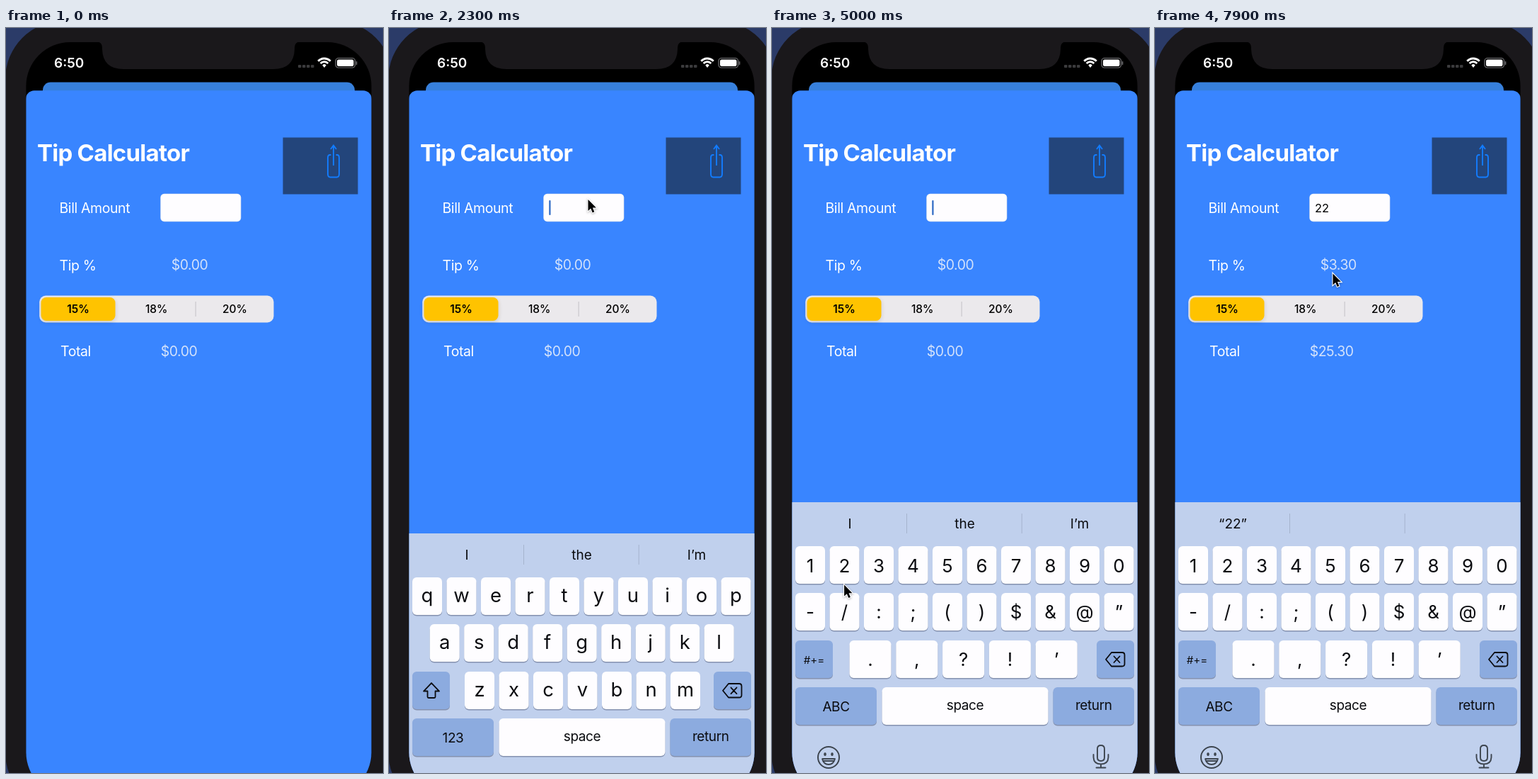
An HTML page with a canvas for the animation above (8000 ms loop, 533x1051 px).

```html
<!DOCTYPE html>
<html lang="en">
<head>
<meta charset="utf-8">
<title>Tip Calculator</title>
<style>
html, body { margin: 0; width: 100%; height: 100%; overflow: hidden; background: #1a181b; }
canvas { display: block; width: 533px; height: 1051px; }
</style>
</head>
<body>
<canvas id="stage"></canvas>
<script>
const LOOP = 8000;
const FIRST_DIGIT = 5640, SECOND_DIGIT = 6100;
const KEYBOARD_START = 2120, NUMBERS_AT = 3550, CARET_AT = 2000;
const KEY_PITCH = 48.5, ROWS = [731, 797, 864, 930];
const INK = '#0b0c10';

const canvas = document.getElementById('stage');
const ctx = canvas.getContext('2d');
const ratio = window.devicePixelRatio || 1;
canvas.width = 533 * ratio;
canvas.height = 1051 * ratio;

function box(x, y, w, h, radius, fill) {
  ctx.beginPath();
  ctx.roundRect(x, y, w, h, radius);
  ctx.fillStyle = fill;
  ctx.fill();
}

function text(str, x, y, size, { weight = 400, color = INK, align = 'left', spacing = 0 } = {}) {
  ctx.font = `${weight} ${size}px Inter, sans-serif`;
  ctx.letterSpacing = spacing + 'px';
  ctx.textAlign = align;
  ctx.fillStyle = color;
  ctx.fillText(str, x, y);
}

function stroke(path, color, width) {
  ctx.strokeStyle = color;
  ctx.lineWidth = width;
  ctx.stroke(new Path2D(path));
}

// Pointer stops: time, x, y
const stops = [
  [1000, 440, 300], [1700, 281.5, 242], [2350, 281.5, 242], [2800, 162.5, 784],
  [3300, 83.5, 947], [4400, 83.5, 947], [5200, 105.5, 756], [6500, 105.5, 756],
  [7300, 251.5, 346.5], [8000, 251.5, 346.5]
];

function pointerAt(t) {
  const next = stops.findIndex(stop => stop[0] > t);
  if (next < 1) return null;
  const [t0, x0, y0] = stops[next - 1], [t1, x1, y1] = stops[next];
  const p = (t - t0) / (t1 - t0), eased = p * p * (3 - 2 * p);
  return [x0 + (x1 - x0) * eased, y0 + (y1 - y0) * eased];
}

function drawPointer([x, y]) {
  ctx.save();
  ctx.translate(x, y);
  const arrow = new Path2D('M0 0V16L3.7 12.6L6.2 18.4L8.8 17.3L6.4 11.6H11.4Z');
  ctx.shadowColor = 'rgba(0,0,0,.3)';
  ctx.shadowBlur = 3 * ratio;
  ctx.shadowOffsetY = ratio;
  ctx.lineWidth = 2.2;
  ctx.strokeStyle = '#fff';
  ctx.stroke(arrow);
  ctx.shadowColor = 'transparent';
  ctx.fillStyle = '#000';
  ctx.fill(arrow);
  ctx.restore();
}

function drawStatusBar() {
  ctx.fillStyle = '#1a181b';
  ctx.fill(new Path2D('M128 19Q136 20 136 28V30Q137 58 166 58H378Q407 58 408 30V28Q408 20 416 19Z'));
  text('6:50', 68, 56, 19, { weight: 600, color: '#fff' });
  for (let i = 0; i < 4; i++) box(413 + i * 6, 52, 4.5, 4, 1, '#3b3b3d');

  ctx.strokeStyle = '#fff';
  ctx.lineWidth = 2.8;
  for (const r of [12, 7.3]) {
    ctx.beginPath();
    ctx.arc(450, 55, r, -Math.PI * .76, -Math.PI * .24);
    ctx.stroke();
  }
  ctx.beginPath();
  ctx.moveTo(450, 56);
  ctx.arc(450, 55, 3.7, -Math.PI * .76, -Math.PI * .24);
  ctx.fillStyle = '#fff';
  ctx.fill();

  ctx.beginPath();
  ctx.roundRect(466, 42.5, 27.5, 13.5, 4);
  ctx.strokeStyle = '#77777a';
  ctx.lineWidth = 1.2;
  ctx.stroke();
  box(468, 44.5, 23.5, 9.5, 2.3, '#fff');
  box(494.8, 47, 1.5, 5, 1, '#77777a');
}

function drawForm(t) {
  const bill = t < FIRST_DIGIT ? '' : t < SECOND_DIGIT ? '2' : '22';
  const money = value => '$' + value.toFixed(2);
  const label = { color: '#fff', spacing: -.4 };
  const amount = { color: '#d3e2fb', spacing: -.5 };

  text('Tip Calculator', 44, 188, 33, { weight: 700, color: '#fff', spacing: -.75 });
  text('Bill Amount', 75.5, 261, 19.5, label);
  text('Tip %', 75.5, 341.5, 19.5, label);
  text('Total', 77, 463, 19.5, label);
  text(money(bill * .15), 233.7, 340.5, 19.5, amount);
  text(money(bill * 1.15), 218.7, 463, 19.5, amount);

  box(391.5, 154.5, 106, 80, 0, '#23457b');
  stroke('M459.5 179H458Q455 179 455 183V206Q455 210.5 458.5 210.5H467.5Q471 210.5 471 206V183Q471 179 468 179H466.5M463 194V165.5M459 171L463 165.5L467 171', '#127cff', 1.9);

  box(218.3, 233.7, 114, 39.5, 5.5, '#d9dfec');
  box(218.9, 234.3, 112.8, 38.3, 5, '#fefdff');
  text(bill, 226, 260, 16.5, { color: '#000' });
  const caretReset = t >= SECOND_DIGIT ? SECOND_DIGIT : t >= FIRST_DIGIT ? FIRST_DIGIT : CARET_AT;
  if (t >= CARET_AT && (t - caretReset) % 1000 < 600) {
    box(226.3 + bill.length * 9.5, 243, 2.2, 21, 1, '#2c69c4');
  }

  box(47.2, 377.5, 331.3, 38, 9, '#ebe9ec');
  ctx.save();
  ctx.shadowColor = 'rgba(0,0,0,.14)';
  ctx.shadowBlur = 6 * ratio;
  ctx.shadowOffsetY = 2 * ratio;
  box(49.5, 380, 105, 33, 7.5, '#ffc300');
  ctx.restore();
  box(267.5, 386, 1.2, 21, 0, '#c9c8cc');
  ['15%', '18%', '20%'].forEach((rate, i) =>
    text(rate, 102 + i * 110.7, 402, 15.5, { weight: i ? 500 : 600, color: '#000', align: 'center' }));
}

function key(x, y, w, label, size, baseline, fill = '#fefdff') {
  box(x, y + 1.5, w, 53, 6, '#8592af');
  box(x, y, w, 53, 6, fill);
  text(label, x + w / 2, y + baseline, size, { align: 'center', spacing: size === 19 ? -.4 : 0 });
}

function keyRow(labels, x, y, size, baseline, pitch = KEY_PITCH, width = 42) {
  [...labels].forEach((c, i) => key(x + i * pitch, y, width, c, size, baseline));
}

function drawSuggestions(t) {
  const word = (str, x) => text(str, x, 706, 19, { align: 'center' });
  box(190, 685, 1, 28, 0, '#a5b3cd');
  box(352.7, 685, 1, 28, 0, '#a5b3cd');
  if (t < FIRST_DIGIT) {
    ['I', 'the', 'I’m'].forEach((str, i) => word(str, 110 + i * 162.5));
  } else if (t < FIRST_DIGIT + 140) {
    text('“2', 99, 706, 19);
    text('”', 118, 706, 19, { color: 'rgba(11,12,16,.12)' });
    box(259.5, 696, 1, 11, 0, '#aebdd8');
    box(423.5, 696, 1, 11, 0, '#aebdd8');
  } else {
    word(t < SECOND_DIGIT ? '“2”' : '“22”', 110);
  }
}

function drawKeyboard(t) {
  if (t < KEYBOARD_START) return;
  const numeric = t >= NUMBERS_AT, action = '#8cabdf';
  const k = (t - KEYBOARD_START) * .0205;
  ctx.save();
  ctx.translate(0, 382 * (1 + k) * Math.exp(-k));
  box(28, 669, 489, 420, 0, '#c0d0ed');
  drawSuggestions(t);

  const [top, middle, lower, bottom] = ROWS;
  if (numeric) {
    keyRow('1234567890', 33, top, 26, 37);
    keyRow('-/:;()$&@”', 33, middle, 26, 35.5);
    keyRow('.,?!’', 109.5, lower, 26, 35.5, 65.8, 59);
  } else {
    keyRow('qwertyuiop', 33, top, 27.5, 34.5);
    keyRow('asdfghjkl', 57.7, middle, 27.5, 34.5);
    keyRow('zxcvbnm', 107, lower, 27.5, 34.5);
  }

  key(33, lower, 53, numeric ? '#+=' : '', 15, 32.5, action);
  key(459, lower, 53, '', 19, 33, action);
  key(33, bottom, 115, numeric ? 'ABC' : '123', 19, 33.5, action);
  key(155.5, bottom, 235, 'space', 19, 32);
  key(397.5, bottom, 114.5, 'return', 19, 32, action);

  ctx.lineJoin = ctx.lineCap = 'round';
  if (!numeric) stroke('M60 880L49 891.5H54.5V899.5Q54.5 901 56 901H64Q65.5 901 65.5 899.5V891.5H71Z', INK, 1.8);
  stroke('M480 881H495Q498.5 881 498.5 884.5V897Q498.5 900.5 495 900.5H480L472 890.7ZM483.5 886.5L491.5 895M491.5 886.5L483.5 895', INK, 1.8);

  const icon = '#3d454f';
  ctx.beginPath();
  ctx.arc(80, 1029, 15, 0, Math.PI * 2);
  ctx.strokeStyle = icon;
  ctx.lineWidth = 2;
  ctx.stroke();
  for (const x of [75, 85]) {
    ctx.beginPath();
    ctx.ellipse(x, 1024.5, 1.8, 2.6, 0, 0, Math.PI * 2);
    ctx.fillStyle = icon;
    ctx.fill();
  }
  stroke('M71 1031H89Q87 1039 80 1039Q73 1039 71 1031ZM72.5 1034H87.5', icon, 1.8);
  stroke('M460 1017Q460 1012 465 1012Q470 1012 470 1017V1029Q470 1034 465 1034Q460 1034 460 1029ZM454.5 1025V1029Q455 1038.5 465 1038.5Q475 1038.5 475.5 1029V1025M465 1038.5V1043.5M458.5 1043.5H471.5', icon, 1.9);
  ctx.restore();
}

function draw(t) {
  ctx.setTransform(ratio, 0, 0, ratio, 0, 0);
  ctx.lineJoin = 'miter';
  ctx.lineCap = 'butt';
  box(0, 0, 533, 1051, 0, '#2b3b68');
  box(-1, -10, 548, 1114, 82, '#1a181b');

  ctx.save();
  ctx.beginPath();
  ctx.roundRect(28.4, 20, 488.2, 1064, 62);
  ctx.clip();
  box(28, 20, 489, 1064, 0, '#000');
  box(52, 76.5, 441, 60, 11, '#3780dc');
  box(28, 88.3, 489, 1000, 12, '#3985ff');
  drawStatusBar();
  drawForm(t);
  drawKeyboard(t);
  ctx.restore();

  const pointer = pointerAt(t);
  if (pointer) drawPointer(pointer);
}

const start = performance.now();
function tick() {
  draw((performance.now() - start) % LOOP);
  requestAnimationFrame(tick);
}
tick();
</script>
</body>
</html>
```
